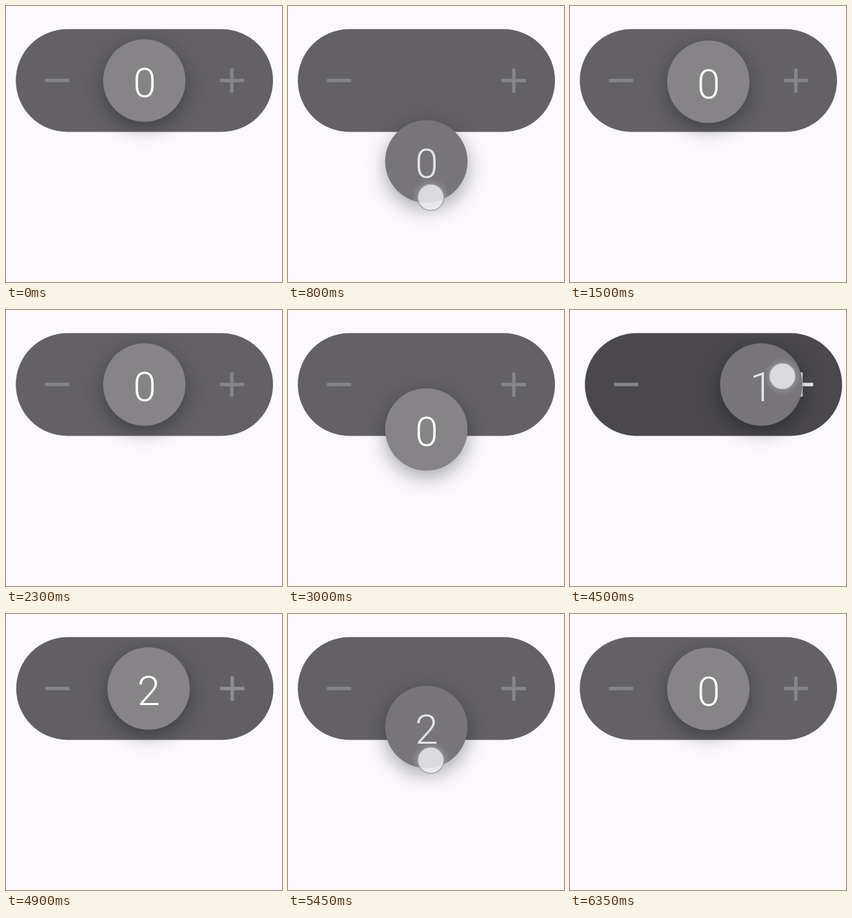
Write an HTML page with a canvas that moves like this. It is 400 by 400 pixels and loops after 6.5 s.

```html
<!DOCTYPE html>
<html lang="en">
<head>
<meta charset="utf-8">
<title>Stepper</title>
<style>
  html, body { margin: 0; width: 100%; height: 100%; overflow: hidden; background: #fbf9fd; }
  canvas { display: block; width: 400px; height: 400px; }
</style>
</head>
<body>
<canvas id="stage" width="400" height="400"></canvas>
<script>
const ctx = document.getElementById('stage').getContext('2d');
const LOOP = 6500;
const CX = 200.5, CY = 108;
const SWING = 260; // half period of the spring, ms

// Each drag: press time, drag start, drag length, release, distance, overshoot ratio
const drags = [
  { axis: 'y', press: 540,  start: 590,  dur: 360, up: 965,  size: 185, bounce: 0.1 },
  { axis: 'y', press: 2620, start: 2640, dur: 240, up: 2894, size: 170, bounce: 0.11 },
  { axis: 'x', press: 3650, start: 3707, dur: 300, up: 4035, size: 125, bounce: 0.15, value: 1 },
  { axis: 'x', press: 4270, start: 4332, dur: 300, up: 4740, size: 125, bounce: 0.18, value: 2 },
  { axis: 'y', press: 5270, start: 5320, dur: 360, up: 5700, size: 190, bounce: 0.11, value: 0 }
];

const clamp = v => Math.max(0, Math.min(1, v));
const mix = (a, b, k) => a + (b - a) * k;
const tone = (a, b, k) => `rgb(${a.map((v, i) => Math.round(mix(v, b[i], k))).join(',')})`;

function pull(d, t) {
  const p = clamp((t - d.start) / d.dur);
  return d.size * (1 - Math.cos(Math.PI * p)) / 2;
}

function spring(d, t) {
  if (t > 702) return 0;
  const w = Math.PI / SWING;
  const a = -Math.log(d.bounce) / SWING;
  return d.size * Math.exp(-a * t) * (Math.cos(w * t) + a / w * Math.sin(w * t));
}

function stateAt(t) {
  const s = { x: 0, y: 0, value: 0, touch: 0, tx: 0, ty: 0 };
  for (const d of drags) {
    if (t < d.press) break;
    const reach = pull(d, t);
    s[d.axis] += t < d.up ? reach : spring(d, t - d.up);
    if (t >= d.up && d.value !== undefined) s.value = d.value;
    const alpha = clamp((t - d.press) / 60) * clamp(1 - (t - d.up) / 80);
    if (alpha > 0) {
      s.touch = alpha;
      s.tx = d.axis === 'x' ? 240.5 + reach * 0.9 : 207;
      s.ty = d.axis === 'x' ? 93 + reach * 0.04 : 153 + reach * 1.06;
    }
  }
  return s;
}

function disc(x, y, r, fill) {
  ctx.beginPath();
  ctx.arc(x, y, r, 0, 2 * Math.PI);
  ctx.fillStyle = fill;
  ctx.fill();
}

function drawPill(shift) {
  const k = clamp(Math.abs(shift) / 75);
  const left = 14.2 + shift * 0.096;
  ctx.fillStyle = tone([99, 97, 100], [74, 72, 75], k);
  ctx.beginPath();
  ctx.roundRect(left, 33.5, 372.8, 149, 74.5);
  ctx.fill();

  const idle = [134, 133, 136], lit = [242, 241, 243];
  ctx.fillStyle = tone(idle, lit, shift < -40 ? k : 0);
  ctx.fillRect(left + 42.3, 105.5, 35, 5);
  ctx.fillStyle = tone(idle, lit, shift > 0 ? k : 0);
  ctx.beginPath();
  ctx.rect(left + 295.5, 105.5, 35.3, 5);
  ctx.rect(left + 310.6, 90.5, 5, 35);
  ctx.fill();
}

function drawKnob(s) {
  const x = CX + s.x, y = CY + s.y;
  ctx.save();
  ctx.shadowColor = 'rgba(0,0,0,0.34)';
  ctx.shadowBlur = 28;
  ctx.shadowOffsetY = 9;
  disc(x, y, 59.7, tone([134, 132, 135], [119, 117, 120], s.touch));
  ctx.restore();
  ctx.font = '300 60px Roboto, sans-serif';
  ctx.textAlign = 'center';
  ctx.textBaseline = 'alphabetic';
  ctx.fillStyle = tone([255, 255, 255], [228, 227, 229], s.touch);
  ctx.fillText(s.value, x + 0.3, y + 24);
}

function drawTouch(s) {
  if (!s.touch) return;
  ctx.save();
  ctx.globalAlpha = s.touch;
  const halo = ctx.createRadialGradient(s.tx, s.ty, 18, s.tx, s.ty, 28);
  halo.addColorStop(0, 'rgba(225,222,235,0.2)');
  halo.addColorStop(1, 'rgba(225,222,235,0)');
  disc(s.tx, s.ty, 28, halo);
  disc(s.tx, s.ty, 19, 'rgba(240,239,244,0.8)');
  ctx.lineWidth = 1.5;
  ctx.strokeStyle = 'rgba(150,147,168,0.75)';
  ctx.stroke();
  ctx.restore();
}

function frame(now) {
  const s = stateAt(now % LOOP);
  ctx.fillStyle = '#fbf9fd';
  ctx.fillRect(0, 0, 400, 400);
  drawPill(s.x);
  drawKnob(s);
  drawTouch(s);
  requestAnimationFrame(() => frame(performance.now()));
}

frame(performance.now());
</script>
</body>
</html>
```
